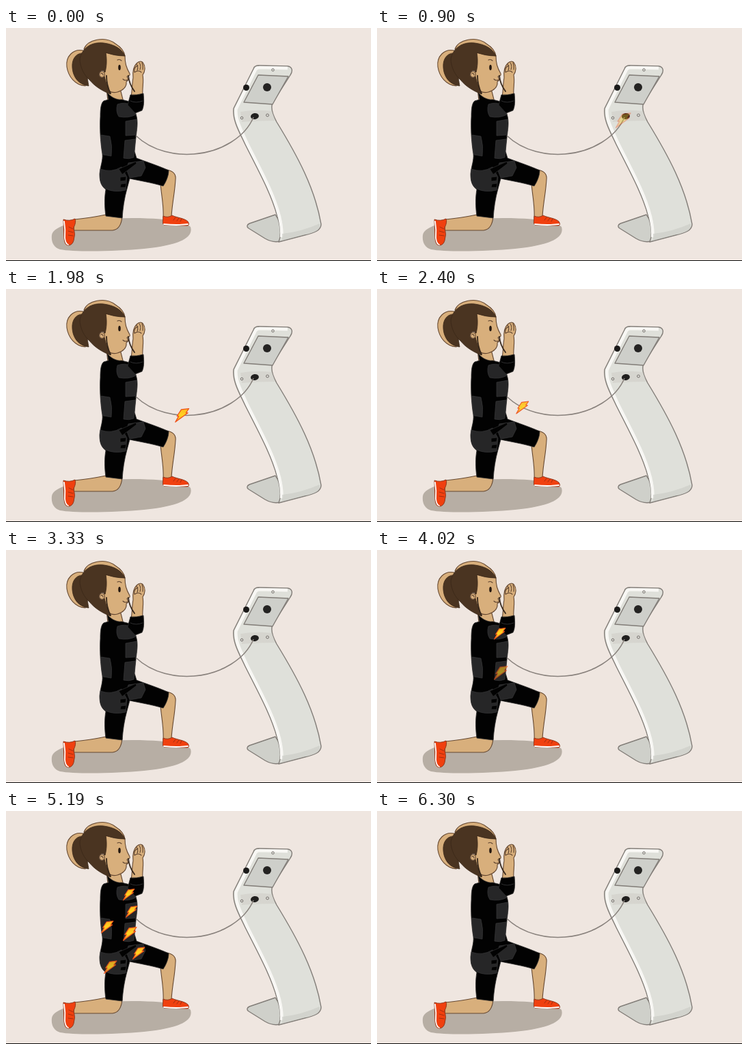
Write an HTML page that moves like this. It is 534 px wide and 342 px high and loops after 6.33 s.

```html
<!DOCTYPE html>
<html lang="en">
<head>
<meta charset="utf-8">
<title>Suit training</title>
<style>
html, body { margin: 0; width: 100%; height: 100%; overflow: hidden; background: #efe6e0; }
svg { display: block; width: 100vw; height: 100vh; }
.line { fill: none; stroke: #5d432f; stroke-width: 1.1; stroke-linecap: round; stroke-linejoin: round; }
.skin { fill: #d8af7c; stroke: #654831; stroke-width: 1.1; stroke-linejoin: round; }
.hair { fill: #4a3421; stroke: #3a2818; stroke-width: .8; stroke-linejoin: round; }
.suit { fill: #020202; stroke: #2b2b2b; stroke-width: .8; stroke-linejoin: round; }
.pad { fill: #262627; stroke: #39393a; stroke-width: .7; stroke-linejoin: round; }
.shoe { fill: #f0400f; stroke: #8f3a20; stroke-width: 1; stroke-linejoin: round; }
.sole { fill: none; stroke: #fff; stroke-width: 1.8; stroke-linecap: round; }
.lace { fill: none; stroke: #8f2a10; stroke-width: .8; stroke-linecap: round; }
.metal { stroke: #817c77; stroke-width: 1.4; stroke-linejoin: round; }
</style>
</head>
<body>
<svg viewBox="0 0 534 342" preserveAspectRatio="none">
  <defs>
    <linearGradient id="glow" x1="0" y1="0" x2="0" y2="1">
      <stop offset="0" stop-color="#ffb81d"/>
      <stop offset=".5" stop-color="#ffd322"/>
      <stop offset="1" stop-color="#ff931c"/>
    </linearGradient>
    <path id="bolt" d="M-1-8.500 10.500-10 6-3.500 9-3.500-10 10.500-5 1.500-7.500 1.500Z" fill="url(#glow)" stroke="#ee511a" stroke-width="1.3" stroke-linejoin="round"/>
  </defs>
  <rect width="534" height="342" fill="#efe6e0"/>

  <path fill="#b7aea4" d="M67 304C69 290 103 282 150 280 205 277 262 281 270 292 275 309 250 319 202 324 162 328 100 329 79 325 69 322 66 313 67 304Z"/>

  <g id="machine">
    <path class="metal" fill="#cfd0ca" d="M394 274 356 287C352 289 352 292 355 294L379 309C386 313 393 315 401 313L404 290Z"/>
    <path class="metal" fill="#dfe0da" d="M362 60C363 56 366 55 370 55L412 56C419 57 420 63 416 69L390 110C387 117 390 127 396 138 426 187 452 235 461 288 461 297 451 301 437 304L399 314C403 304 402 292 397 277 389 245 369 209 350 171 341 152 331 135 333 118Z"/>
    <path fill="none" stroke="#f8f7f4" stroke-width="4.500" stroke-linejoin="round" d="M412 59 371 58Q366 58 364 63L336.500 119C335 134 344 150 353 170 372 208 392 244 400 277 403 290 404 300 403 307"/>
    <path fill="#d2d0ca" opacity=".65" d="M343 123Q366 119 389 122L394 136Q368 136 345 138Z"/>
    <path fill="#cbccc6" opacity=".65" d="M404 302Q432 299 459 287 461 296 449 300L404 312Z"/>
    <path class="metal" fill="#cecfca" d="M369 69 413 71 390 112 348 109Z"/>
    <circle cx="382" cy="87" r="6" fill="#242322"/>
    <circle cx="351.500" cy="87.500" r="4.500" fill="#1b1a19"/>
    <g fill="#dfddd8" stroke="#716d69">
      <circle cx="390.500" cy="61.500" r="1.800"/>
      <circle cx="345" cy="132" r="1.800"/>
      <circle cx="382.500" cy="128" r="1.900"/>
    </g>
    <ellipse cx="364" cy="129.500" rx="6" ry="4.500" fill="#201f1e" transform="rotate(-8 364 130)"/>
  </g>

  <g id="woman">
    <path class="skin" d="M146 274Q122 279 100 281L99 297 156 297C164 296 169 290 170 276Z"/>
    <path class="shoe" d="M84 281Q93 284 101 280 103 285 99 293 102 303 99 312 97 319 91 319 86 319 85 309Z"/>
    <path class="sole" d="M85 284Q87 296 86 308 87 317 91 318"/>
    <path class="lace" d="M92 292 98 295M91 298 98 300M91 304 98 305"/>
    <path class="skin" d="M235 208C245 210 249 214 248 222 247 242 243 257 242 277L230 279C231 262 228 250 226 229Z"/>
    <path class="shoe" d="M230 276Q237 279 243 275C248 278 261 279 266 284 268 287 268 290 265 290L231 289C228 287 230 281 230 276Z"/>
    <path class="sole" d="M231 288Q250 290 266 288"/>
    <path class="lace" d="M245 282 248 278M250 283 253 279M255 284 257 280"/>

    <path class="skin" d="M147 88 149 107 172 109 167 89Z"/>
    <path class="suit" d="M148 94C152 101 162 106 169 105L181 108 190 126C194 138 191 150 190 161L188 181 191 191C207 197 225 203 238 209 238 217 234 226 230 232 213 227 195 224 181 221L177 236C173 250 171 265 170 279L146 276C144 262 144 248 146 237 138 231 137 223 137 214 138 203 142 194 141 185 138 167 137 145 138 130 138 118 139 110 143 107L150 105Z"/>
    <path class="pad" d="M163 112Q174 108 183 113L190 127Q179 133 165 130 160 122 163 112Z"/>
    <path class="pad" d="M139 157 152 159Q156 173 154 188L142 186Q139 171 139 157Z"/>
    <path class="pad" d="M175 137 191 134 190 157 175 158Z"/>
    <path class="pad" d="M174 165 189 163 187 190Q180 193 172 191Z"/>
    <path class="pad" d="M138 207Q154 213 169 204L177 219 175 238Q158 242 146 236 137 231 138 207Z"/>
    <path class="pad" d="M179 198 201 195 204 205 198 217 181 220 176 207Z"/>
    <path class="suit" d="M165 207 190 196 191 199 170 215ZM167 219 176 218 175 224 167 225ZM168 229 176 228 175 234 167 234Z"/>

    <path class="skin" d="M182 105C185 95 184 84 186 73 185 64 187 56 191 52 195 48 199 48 201 52 204 56 204 63 200 69 202 79 199 88 200 100Z"/>
    <path class="line" d="M188 65Q186 58 193 55M191 53Q194 57 192 62M195 51Q198 55 196 61M199 51Q201 56 200 61M188 65Q194 61 198 65"/>
    <path class="suit" d="M182 98Q191 99 201 96C202 107 202 115 199 121L189 125 178 113Z"/>
    <path class="line" style="stroke:#39393a;stroke-width:.8" d="M182 107Q190 111 200 107"/>

    <path class="skin" d="M113 33C98 30 87 42 89 57 91 71 101 84 116 85L119 50Z"/>
    <path class="skin" d="M114 31C119 17 145 11 160 23 168 28 173 34 174 41L145 48Z"/>
    <path class="hair" d="M114 37C103 36 96 45 97 58 98 71 105 83 121 85 120 79 118 69 118 57Z"/>
    <path class="skin" d="M143 36 174 41C174 52 176 58 181 67 182 70 179 71 177 71L179 76 176 79C177 86 171 92 163 94 156 96 148 93 144 86Z"/>
    <path class="hair" d="M108 45C112 28 126 20 143 22 159 24 170 31 174 41 163 41 154 39 146 36 148 48 147 57 145 65 142 60 136 63 136 69 137 73 141 74 144 71 146 80 149 88 153 97 142 93 130 86 122 76 114 69 108 57 108 45Z"/>
    <ellipse class="skin" cx="140.500" cy="68" rx="3.700" ry="4.300"/>
    <path class="line" d="M139 67Q141 65 142 69M163 47Q166 45 169 48M171 75Q174 78 178 76"/>
    <path class="line" style="stroke:#35261a;stroke-width:1.800" d="M147 70Q147 84 153 96M179 70Q180 82 188 93"/>
    <ellipse cx="166" cy="58" rx="1.800" ry="4" fill="#24170f"/>
  </g>

  <path id="cable" d="M362 131C350 160 315 182 275 185 250 187 215 182 190 158" fill="none" stroke="#88817c" stroke-width="1.500"/>
  <g id="bolts"></g>
  <path d="M0 341.500H534" stroke="#0b0a0a"/>
</svg>
<script>
const LOOP = 6330;
const travel = { start: 857, end: 2649 };
const pulse = { start: 3620, gap: 280, fade: 200, end: 6090 };
// x, y and scale of each glowing pad, in order of lighting
const spots = [
  [179.5, 122.5, 0.8], [181, 180, 0.95], [194, 208.5, 0.85],
  [148, 170, 0.85], [183.5, 147.5, 0.8], [152.5, 229, 0.9]
];

const cable = document.getElementById("cable");
const layer = document.getElementById("bolts");
const cableLength = cable.getTotalLength();
const clamp = v => Math.max(0, Math.min(1, v));

function addBolt() {
  const bolt = document.createElementNS("http://www.w3.org/2000/svg", "use");
  bolt.setAttribute("href", "#bolt");
  return layer.appendChild(bolt);
}

function place(bolt, x, y, scale, opacity) {
  bolt.setAttribute("transform", `translate(${x} ${y}) scale(${scale})`);
  bolt.setAttribute("opacity", opacity);
}

const runner = addBolt();
const pads = spots.map(addBolt);

function render(t) {
  const p = clamp((t - travel.start) / (travel.end - travel.start));
  const at = cable.getPointAtLength(p * cableLength);
  const shown = clamp((t - travel.start) / 120) * clamp((travel.end - t) / 270);
  place(runner, at.x, at.y, 1.05 - 0.4 * Math.max(0, p - 0.42), shown);

  spots.forEach(([x, y, scale], i) => {
    const lit = t < pulse.end ? clamp((t - pulse.start - i * pulse.gap) / pulse.fade) : 0;
    place(pads[i], x, y, scale, lit);
  });
}

const began = performance.now();
function tick() {
  render((performance.now() - began) % LOOP);
  requestAnimationFrame(tick);
}
tick();
</script>
</body>
</html>
```
